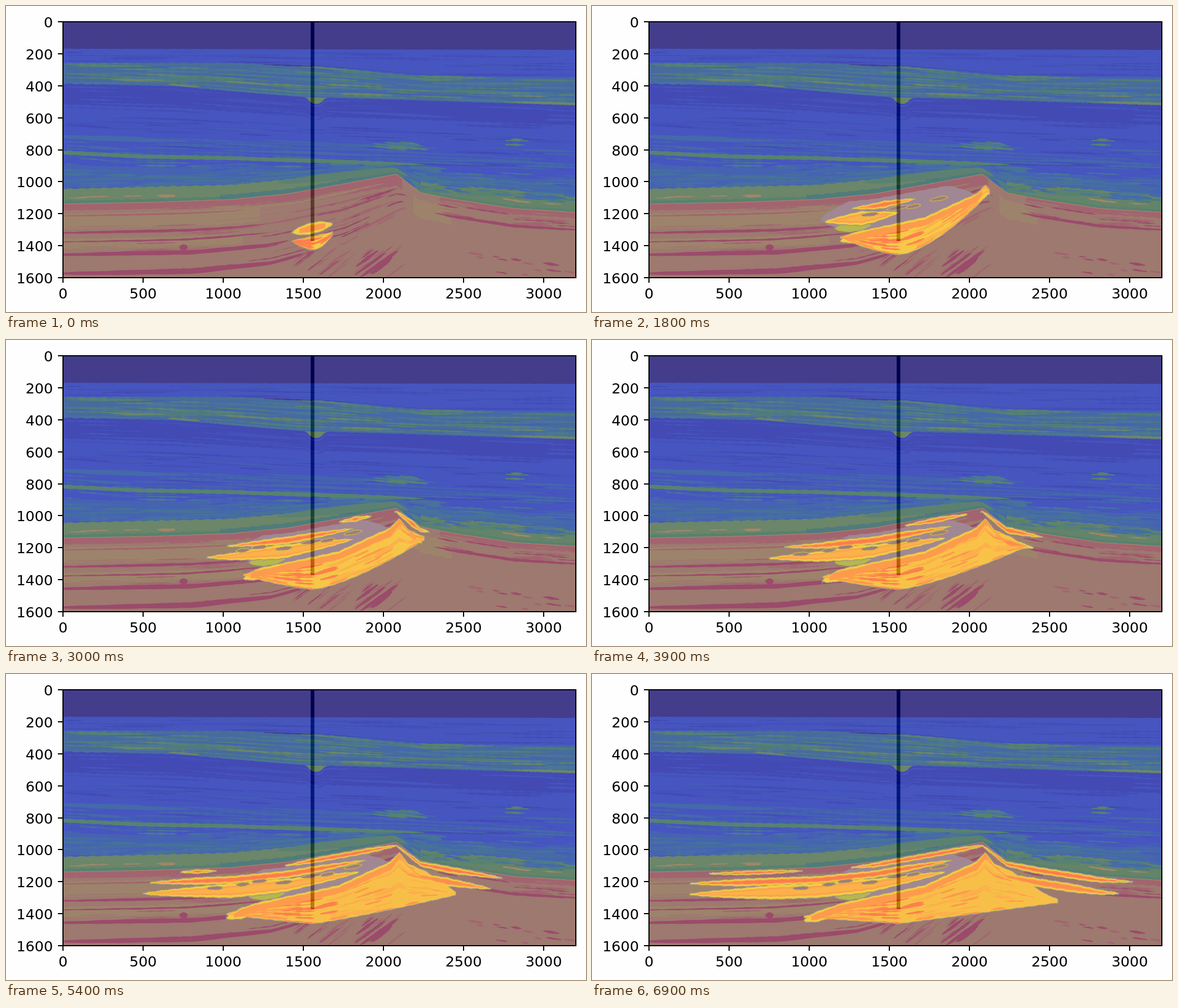
An HTML page with a canvas for the animation above (7.2 s loop, 1028 by 544 pixels).

```html
<!DOCTYPE html>
<html lang="en">
<head>
<meta charset="utf-8">
<title>Plume growth</title>
<style>
html, body { margin: 0; width: 100%; height: 100%; overflow: hidden; background: #fefefe; }
canvas, svg { position: absolute; left: 0; top: 0; }
text { font: 25.45px "DejaVu Sans", sans-serif; fill: #000; }
path { fill: none; stroke: #000; stroke-width: 2; }
</style>
</head>
<body>
<canvas id="stage" width="1028" height="544"></canvas>
<svg id="axes" width="1028" height="544" viewBox="0 0 1028 544"></svg>
<script>
const LEFT = 101, RIGHT = 1010, TOP = 28, BOTTOM = 483;
const W = 1028, H = 544, STEP = 300, LOOP = 7200;

let seed = 11;
function rand(a = 0, b = 1) {
  seed = (seed * 16807) % 2147483647;
  return a + (b - a) * seed / 2147483647;
}
const lerp = (a, b, k) => a + (b - a) * k;
const clamp = (v, a, b) => Math.min(b, Math.max(a, v));
const rough = (x, s) => Math.sin(x * .31 + s) * .7 + Math.sin(x * .83 + s * 2) * .5;

// Horizons are functions of x through a few x, y pairs
const horizon = (...p) => x => {
  let i = 0;
  while (i < p.length - 4 && x > p[i + 2]) i += 2;
  return lerp(p[i + 1], p[i + 3], clamp((x - p[i]) / (p[i + 2] - p[i]), 0, 1));
};
const offset = (f, d) => x => f(x) + d;
const between = (a, b, k) => x => lerp(a(x), b(x), k);

const water = horizon(101, 76, 1010, 78);
const bandTop = horizon(101, 101, 400, 101, 540, 106, 750, 125, 1010, 127);
const bandBed = horizon(101, 138, 300, 143, 520, 162, 700, 167, 1010, 177);
const bandBase = x => bandBed(x) + 11 * Math.exp(-(((x - 549) / 14) ** 4));
const marker = horizon(101, 260, 240, 267, 400, 270, 740, 282, 1010, 292);
const oliveTop = horizon(101, 325, 400, 318, 520, 306, 690, 287, 740, 314, 1010, 337);
const domeTop = horizon(101, 352, 260, 349, 400, 344, 500, 334, 600, 316, 692, 299, 735, 332, 790, 343, 900, 360, 1010, 367);
const deep = horizon(101, 477, 330, 473, 470, 458, 600, 422, 707, 364, 850, 420, 1010, 455);
const floor = () => 490;

// Closed outline between two horizons
function slab(top, base, x0, x1, jag = 1, step = 3) {
  const path = new Path2D(), n = Math.ceil((x1 - x0) / step);
  for (let i = 0; i <= 2 * n + 1; i++) {
    const upper = i <= n, x = lerp(x0, x1, (upper ? i : 2 * n + 1 - i) / n);
    path.lineTo(x, (upper ? top : base)(x) + rough(x, upper ? 1 : 4) * jag);
  }
  path.closePath();
  return path;
}
function fill(g, path, color) {
  g.fillStyle = color;
  g.fill(path);
}
function layer(g, top, base, color, x0 = LEFT, x1 = RIGHT, jag = 1) {
  fill(g, slab(top, base, x0, x1, jag), color);
}
// A thin lens that follows a horizon
function lens(g, f, x0, x1, half, color) {
  const swell = x => half * Math.sqrt(Math.sin(Math.PI * clamp((x - x0) / (x1 - x0), 0, 1)));
  fill(g, slab(x => f(x) - swell(x), x => f(x) + swell(x), x0, x1, .4, (x1 - x0) / 30), color);
}
function streaks(g, a, b, count, colors, len, half, x0 = LEFT, x1 = RIGHT) {
  for (let i = 0; i < count; i++) {
    const x = rand(x0, x1), l = rand(.3, 1) * len;
    lens(g, between(a, b, rand()), Math.max(x0, x - l / 2), Math.min(x1, x + l / 2),
      rand(.35, 1) * half, colors[i % colors.length]);
  }
}
function slants(g, count, x0, x1, y0, y1, slope, len, half, colors) {
  for (let i = 0; i < count; i++) {
    const x = rand(x0, x1), y = rand(y0, y1), l = rand(.4, 1) * len;
    lens(g, v => y + (v - x) * slope, x - l / 2, x + l / 2, rand(.4, 1) * half, colors[i % colors.length]);
  }
}

function drawBeds(g) {
  const navy = "#434ab4", blue = "#4655bf", teal = "#4569aa", sea = "#4a7894",
    green = "#578270", olive = "#6b8669";
  g.fillStyle = "#433d8c";
  g.fillRect(LEFT, TOP, RIGHT - LEFT, BOTTOM - TOP);
  layer(g, water, floor, blue, LEFT, RIGHT, .2);

  // Shallow green band
  streaks(g, offset(water, 6), bandTop, 55, [navy, "#4450ba", "#4559b8"], 210, 1.6);
  layer(g, bandTop, bandBase, "#486b9f");
  streaks(g, bandTop, bandBed, 100, [teal, "#4a7290", sea, "#4562b0"], 200, 1.8);
  streaks(g, bandTop, offset(bandBed, -2), 75, [green, "#527c7b", sea], 170, 1.8);
  streaks(g, between(bandTop, bandBed, .5), offset(bandBed, -3), 22, [olive, green], 130, 1.9);
  lens(g, offset(bandTop, 1), 455, 545, 1.2, "#433d8c");
  layer(g, bandBed, bandBase, olive, 528, 570, 0);
  lens(g, offset(bandBed, -3), 900, RIGHT + 30, 2.5, olive);

  // Blue beds down to the marker
  layer(g, bandBase, between(bandBed, marker, .3), navy);
  streaks(g, bandBase, between(bandBed, marker, .65), 100, ["#4450b9", blue, navy], 170, 1.8);
  streaks(g, between(bandBed, marker, .45), marker, 80, [navy, "#465cb6", blue], 150, 1.6);
  streaks(g, between(bandBed, marker, .7), marker, 65, [teal, "#4562b0"], 190, 2.1);
  lens(g, between(bandBed, marker, .77), 60, 330, 4, teal);
  slants(g, 9, 680, 720, 244, 256, .1, 80, 2.5, [sea, green]);
  slants(g, 4, 892, 908, 237, 247, .03, 42, 2, [green]);

  // Beds above the dome
  layer(g, between(marker, oliveTop, .35), domeTop, "#4663b2");
  streaks(g, offset(marker, 6), oliveTop, 190, [teal, "#4660b4", sea, blue, teal], 90, 2);
  streaks(g, between(marker, oliveTop, .6), oliveTop, 100, [teal, "#477299"], 120, 2.6);
  streaks(g, offset(marker, 4), domeTop, 70, [teal, sea, "#477299"], 80, 3, 570, 790);
  layer(g, offset(marker, -3), offset(marker, 4), green, LEFT, 540, .5);
  lens(g, marker, 400, 742, 3.6, green);
  layer(g, oliveTop, domeTop, olive, LEFT, 590);
  layer(g, oliveTop, domeTop, "#648469", 735);
  lens(g, offset(oliveTop, 4), 480, 715, 7, "#5c8170");
  layer(g, between(oliveTop, domeTop, .78), domeTop, green, LEFT, 380);
  layer(g, between(oliveTop, domeTop, .66), domeTop, "#4f7c7c", 380, 705);
  streaks(g, oliveTop, offset(oliveTop, 14), 45, [sea, green, teal], 65, 2.2, 720);
  layer(g, offset(domeTop, -5), domeTop, green, 725);
  streaks(g, offset(domeTop, -12), offset(domeTop, -9), 7, ["#a0876a"], 60, 1.8, LEFT, 300);
  streaks(g, offset(domeTop, -15), offset(domeTop, -12), 4, ["#a0876a"], 45, 1.5, 880);
}

function drawDome(g) {
  const brown = "#9d796f", tan = "#9d836b", pink = "#a2646f", wine = "#9b4b6b";
  layer(g, domeTop, floor, brown, LEFT, RIGHT, .3);
  layer(g, offset(domeTop, 17), offset(domeTop, 44), tan, LEFT, 450, 1.3);
  layer(g, offset(domeTop, 62), offset(domeTop, 80), tan, LEFT, 420);
  layer(g, domeTop, offset(domeTop, 11), pink, LEFT, 480);
  layer(g, domeTop, offset(domeTop, 20), pink, 480, 702);
  layer(g, domeTop, offset(domeTop, 10), pink, 770);
  streaks(g, offset(domeTop, 6), between(domeTop, deep, .45), 36, [pink, tan, brown], 170, 1.8, LEFT, 690);
  streaks(g, between(domeTop, deep, .4), deep, 24, [brown, pink, wine], 150, 1.6, LEFT, 690);
  for (const [k, half] of [[.17, 1.5], [.41, 2.4], [.54, 1.5], [.72, 4], [.99, 4.5]])
    lens(g, between(domeTop, deep, k), 70, 400 + 150 * k, half, k < .2 ? pink : wine);
  lens(g, () => 429, 307, 322, 5, wine);
  streaks(g, between(domeTop, deep, .3), deep, 18, [pink, wine], 75, 1.8, 570, 712);

  // Steep beds under the dome
  slants(g, 22, 530, 690, 435, 475, -.75, 55, 2, [pink, pink, wine]);
  slants(g, 7, 640, 690, 448, 466, -.72, 75, 4, [wine]);

  // Right flank
  layer(g, offset(domeTop, 14), offset(domeTop, 46), tan, 722, 790);
  streaks(g, offset(domeTop, 6), offset(domeTop, 32), 32, [pink, brown, wine], 90, 2, 765);
  lens(g, offset(domeTop, 31), 757, RIGHT + 20, 2.6, wine);
  slants(g, 12, 810, 1000, 430, 480, .15, 30, 2.4, [wine, pink]);

  g.strokeStyle = "#ab8368";
  g.lineWidth = 1.2;
  g.stroke(slab(domeTop, domeTop, LEFT, RIGHT, 0));
}

// A seam lies a fixed depth under the dome and spreads both ways from x at its own speeds
const seam = (depth, half, x, born, speed, limits, taper, core) => ({ depth, half, x, born, speed, limits, taper, core });
const seams = [
  seam(22, 6, 530, .6, [57, 35], [175, 636], 90, "#fc7d4c"),
  seam(41, 12, 470, .6, [47, 60], [172, 625], 150, "#fcb14b"),
  seam(5, 3, 372, 4.5, [68, 0], [208, 372], 60, "#fc7d4c"),
  seam(6, 4, 628, 2.1, [40, 20], [460, 697], 50, "#fc7d4c"),
  seam(6, 5, 695, 2, [5, 54], [690, 957], 80, "#fc7d4c"),
  seam(28, 7, 705, 2.4, [0, 51], [705, 932], 80, "#fc8d4c")
];
const haze = seam(36, 27, 530, .5, [130, 150], [405, 680], 50);
const dusk = seam(55, 8, 470, .8, [40, 40], [430, 495], 20);

function seamPath(s, t, thick = 1, inset = 0) {
  const age = t - s.born, [min, max] = s.limits;
  const a = Math.max(min, s.x - s.speed[0] * age) + inset;
  const b = Math.min(max, s.x + s.speed[1] * age) - inset;
  if (age < 0 || b - a < 5) return new Path2D();
  const edge = Math.min(s.taper, (b - a) / 2), mid = offset(domeTop, s.depth);
  const half = x => s.half * thick * clamp(Math.min(x - a, b - x) / edge, 0, 1) ** .7;
  return slab(x => mid(x) - half(x), x => mid(x) + half(x), a, b, .6);
}

// The main body widens with the square root of time
const trunkTop = horizon(378, 431, 450, 408, 590, 378, 650, 350, 682, 336, 697, 318, 713, 338, 745, 352, 800, 390, 825, 401);
function trunk(t) {
  const xl = 508 - 50 * Math.sqrt(t), xr = 578 + 94 * Math.sqrt(t);
  const top = offset(trunkTop, 22 * Math.max(0, 1 - t / 1.2));
  const low = 443 - 10 * Math.exp(-t), bend = 1.7 - .1 * t;
  const base = x => {
    const end = x < 545 ? xl : xr, y = top(end) + (x < 545 ? 1 : 5);
    return Math.max(top(x), lerp(low, y, clamp((x - 545) / (end - 545), 0, 1) ** bend));
  };
  const crestHalf = x => 9 * clamp(Math.min(x - xl, Math.min(xr, 712) - x) / 25, 0, 1) ** .6;
  const crest = (thick, inset) => slab(x => trunkTop(x) + 7 - crestHalf(x) * thick,
    x => trunkTop(x) + 7 + crestHalf(x) * thick, xl + inset, Math.min(xr, 712) - inset, .6);
  return { xl, xr, top, base, crest, path: slab(top, base, xl, xr, .5) };
}

const canvas = document.getElementById("stage"), ctx = canvas.getContext("2d");
const rock = document.createElement("canvas");
rock.width = W;
rock.height = H;
const rockCtx = rock.getContext("2d");
rockCtx.rect(LEFT, TOP, RIGHT - LEFT, BOTTOM - TOP);
rockCtx.clip();
drawBeds(rockCtx);
drawDome(rockCtx);

const grain = Array.from({ length: 90 }, () => {
  const x = rand(420, 760), k = rand();
  const near = Math.abs(x - 540) < 45 && k > .2;
  return { x, k, len: rand(20, 65), half: rand(.8, 2.4), color: near ? "#fd804c" : rand() < .6 ? "#fcb04b" : "#fd994c" };
});
const gaps = Array.from({ length: 7 }, (_, i) => ({ x: 375 + i * 40 + rand(-8, 8), half: rand(9, 18), depth: rand(29, 36) }));

function drawPlume(t) {
  const body = trunk(t);
  const shapes = [body.path, body.crest(1, 0), ...seams.map(s => seamPath(s, t))];
  fill(ctx, seamPath(haze, t), "#a18794");
  fill(ctx, seamPath(dusk, t), "#b5b74f");
  for (const [color, width] of [["#a18b91", 3.5], ["#bcbe4d", 1.4]]) {
    ctx.strokeStyle = color;
    ctx.lineWidth = width;
    shapes.forEach(p => ctx.stroke(p));
  }
  shapes.forEach(p => fill(ctx, p, "#f5cb46"));

  // Warmer grain along the dip of the main body
  ctx.save();
  ctx.clip(body.path);
  fill(ctx, body.path, `rgba(253, 172, 77, ${clamp((t - 1) / 10, 0, .4)})`);
  for (const s of grain)
    lens(ctx, between(body.top, body.base, s.k), s.x - s.len / 2, s.x + s.len / 2, s.half, s.color);
  ctx.restore();
  fill(ctx, body.crest(.6, 12), "#fd9b4c");

  for (const s of seams) {
    fill(ctx, seamPath(s, t, .7, 8), "#fca24b");
    fill(ctx, seamPath(s, t, .45, 22), s.core);
  }
  for (const { x, half, depth } of gaps) {
    if (t < 1.8 || x < 540 - 47 * t) continue;
    const f = offset(domeTop, depth);
    lens(ctx, f, x - half - 2, x + half + 2, 4, "#c8b84c");
    lens(ctx, f, x - half, x + half, 2.8, "#a07d7e");
  }
}

function draw(now) {
  const t = Math.floor((now % LOOP) / STEP) * STEP / 1000;
  ctx.clearRect(0, 0, W, H);
  ctx.drawImage(rock, 0, 0);
  drawPlume(t);
  // The well darkens what lies below it by a fixed amount
  ctx.globalCompositeOperation = "difference";
  ctx.fillStyle = "#433d41";
  ctx.fillRect(540, TOP, 6.5, 390);
  ctx.globalCompositeOperation = "source-over";
}

function buildAxes() {
  let ticks = "", labels = "";
  for (let v = 0; v <= 3000; v += 500) {
    const x = Math.round(LEFT + v * .28406);
    ticks += `M${x} ${BOTTOM}v9`;
    labels += `<text x="${x}" y="520" text-anchor="middle">${v}</text>`;
  }
  for (let v = 0; v <= 1600; v += 200) {
    const y = Math.round(TOP + v * .2844);
    ticks += `M${LEFT} ${y}h-9`;
    labels += `<text x="83.2" y="${y + 9.6}" text-anchor="end">${v}</text>`;
  }
  document.getElementById("axes").innerHTML =
    `<path d="M${LEFT} ${TOP}H${RIGHT}V${BOTTOM}H${LEFT}Z${ticks}"/>${labels}`;
}

buildAxes();
const start = performance.now();
function tick() {
  draw(performance.now() - start);
  requestAnimationFrame(tick);
}
tick();
</script>
</body>
</html>
```
